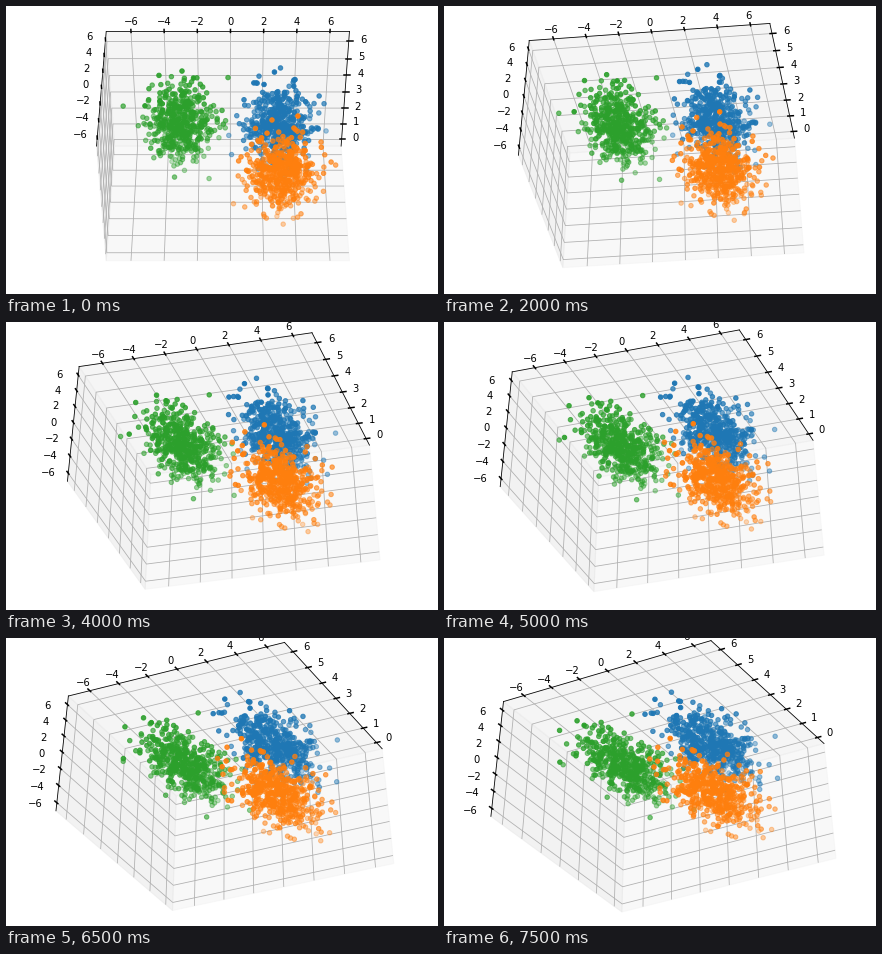
Recreate the animation shown at these times as a matplotlib script. Size 432 by 288 pixels, loop 8 s.

```python
import numpy as np
import matplotlib.pyplot as plt
from matplotlib.animation import FuncAnimation
from matplotlib.collections import LineCollection
from matplotlib.colors import to_rgb
from matplotlib.patches import Polygon

FRAMES, INTERVAL = 16, 500
ELEV, STEP, DIST = np.radians(-45), np.radians(2), 10
CENTER = np.array([3.07, -0.16, 0.1])
SPAN = np.array([6.73, 14.08, 13.48])

DELTA = 1 / 12
EDGE = 0.5 + DELTA / 4
LABEL_EDGE = EDGE + 11.5 / 15 * DELTA
BACK = EDGE * np.array([-1, -1, 1])  # corner farthest from the viewer

# mean, colour and stray points of each cluster
CLUSTERS = [
    ((3, 3, 3), 'tab:blue', [
        (5.38, 3.02, 5.06), (5.98, 2.61, 3.21), (4.95, 1.73, 4.95),
        (5.54, 1.39, 2.80), (1.73, 5.99, 4.71), (0.58, 4.77, 2.05),
        (1.80, -0.10, 4.00), (1.39, 0.07, 2.40)]),
    ((3, -3, 3), 'tab:green', [
        (3.87, -6.53, 3.44), (5.10, -5.07, 0.88), (5.81, -4.26, 3.16),
        (5.92, -2.89, 3.47), (6.05, -2.19, 2.30), (5.04, -0.15, 4.57),
        (4.35, -4.78, 5.10), (0.44, -1.33, 1.26), (1.29, -3.43, -0.19)]),
    ((3, 3, -3), 'tab:orange', [
        (3.10, 6.26, -2.25), (3.64, 5.93, -2.95), (1.14, 4.03, -4.69),
        (1.05, 0.18, -2.95), (6.17, 3.87, -2.60), (5.63, 2.40, -1.95),
        (1.13, 2.02, -4.58)]),
]

# axis index, ticks, axis crossed by the tick marks, axis moved to the near side
AXES = [
    (0, range(0, 7), 1, 1),
    (1, range(-6, 7, 2), 0, 0),
    (2, range(-6, 7, 2), 0, 0),
]


def project(points, azim):
    """Project box coordinates to the screen; also return the depth."""
    x, y, z = np.moveaxis(np.asarray(points, float), -1, 0)
    ahead = x * np.cos(azim) + y * np.sin(azim)
    side = y * np.cos(azim) - x * np.sin(azim)
    up = z * np.cos(ELEV) - ahead * np.sin(ELEV)
    depth = DIST - ahead * np.cos(ELEV) - z * np.sin(ELEV)
    return np.stack([side, up], -1) * DIST / depth[..., None], depth


def moved(point, **coords):
    """Copy a point with some coordinates (a0, a1, a2) replaced."""
    out = np.array(point, float)
    for name, value in coords.items():
        out[int(name[1])] = value
    return out


def at(point, axis, value):
    return moved(point, **{f'a{axis}': value})


def make_cluster(rng, mean, strays):
    noise = rng.normal(size=(505, 3))
    noise = noise[np.linalg.norm(noise, axis=1) < 3.0]
    points = np.vstack([noise + mean, strays])
    return (points - CENTER) / SPAN


class Pane:
    def __init__(self, ax, axis, gray):
        a, b = [i for i in range(3) if i != axis]
        self.corners = [at(at(BACK, a, s), b, t) for s, t in
                        ((-EDGE, -EDGE), (EDGE, -EDGE), (EDGE, EDGE), (-EDGE, EDGE))]
        self.patch = ax.add_patch(Polygon(np.zeros((4, 2)), fc=(gray,) * 3,
                                          ec=(gray,) * 3, alpha=0.5, lw=1, zorder=1))

    def update(self, azim):
        self.patch.set_xy(project(self.corners, azim)[0])


class Axis:
    def __init__(self, ax, axis, ticks, cross, flip):
        base = at(BACK, flip, -BACK[flip])
        self.ends = [at(base, axis, -EDGE), at(base, axis, EDGE)]
        self.grid, self.marks, self.anchors = [], [], []
        for tick in ticks:
            value = (tick - CENTER[axis]) / SPAN[axis]
            corner, foot = at(BACK, axis, value), at(base, axis, value)
            a, b = (axis + 1) % 3, (axis + 2) % 3
            self.grid.append([at(corner, a, -BACK[a]), corner, at(corner, b, -BACK[b])])
            self.marks.append([at(foot, cross, foot[cross] - 0.1 * DELTA),
                               at(foot, cross, foot[cross] + 0.2 * DELTA)])
            self.anchors.append(at(np.sign(base) * LABEL_EDGE, axis, value))
        self.line, = ax.plot([], [], color='k', lw=0.8, zorder=2)
        self.grid_lines = ax.add_collection(
            LineCollection([], colors='#b0b0b0', linewidths=0.8, zorder=2), autolim=False)
        self.mark_lines = [ax.plot([], [], color='k', lw=1.5, zorder=2)[0] for _ in ticks]
        self.labels = [ax.text(0, 0, str(t).replace('-', '\u2212'), fontsize=10,
                               ha='center', va='top', zorder=2) for t in ticks]

    def update(self, azim):
        self.line.set_data(*project(self.ends, azim)[0].T)
        self.grid_lines.set_segments(list(project(self.grid, azim)[0]))
        for line, mark in zip(self.mark_lines, project(self.marks, azim)[0]):
            line.set_data(*mark.T)
        for label, pos in zip(self.labels, project(self.anchors, azim)[0]):
            label.set_position(pos)


class Cloud:
    def __init__(self, ax, points, color):
        self.points = points
        self.rgba = np.tile([*to_rgb(color), 1.0], (len(points), 1))
        self.dots = ax.scatter(*np.zeros((2, len(points))), s=20, linewidths=1, zorder=4)

    def update(self, azim):
        xy, depth = project(self.points, azim)
        z = -DIST / depth
        self.rgba[:, 3] = 1 - 0.7 * (z - z.min()) / np.ptp(z)
        self.dots.set_offsets(xy)
        self.dots.set_facecolors(self.rgba)
        self.dots.set_edgecolors(self.rgba)


fig = plt.figure(figsize=(6, 4), dpi=72, facecolor='white')
ax = fig.add_axes([0, 0, 1, 1])
ax.set_axis_off()

rng = np.random.default_rng(7)
parts = [Pane(ax, i, gray) for i, gray in enumerate((0.95, 0.90, 0.925))]
parts += [Axis(ax, *spec) for spec in AXES]
parts += [Cloud(ax, make_cluster(rng, mean, strays), color)
          for mean, color, strays in CLUSTERS]
ax.set(xlim=(-0.95, 0.9), ylim=(-0.95, 0.9))


def update(i):
    for part in parts:
        part.update(i * STEP)
    return []


anim = FuncAnimation(fig, update, frames=FRAMES, interval=INTERVAL,
                     repeat=True, repeat_delay=0, blit=False)
plt.show()
```
